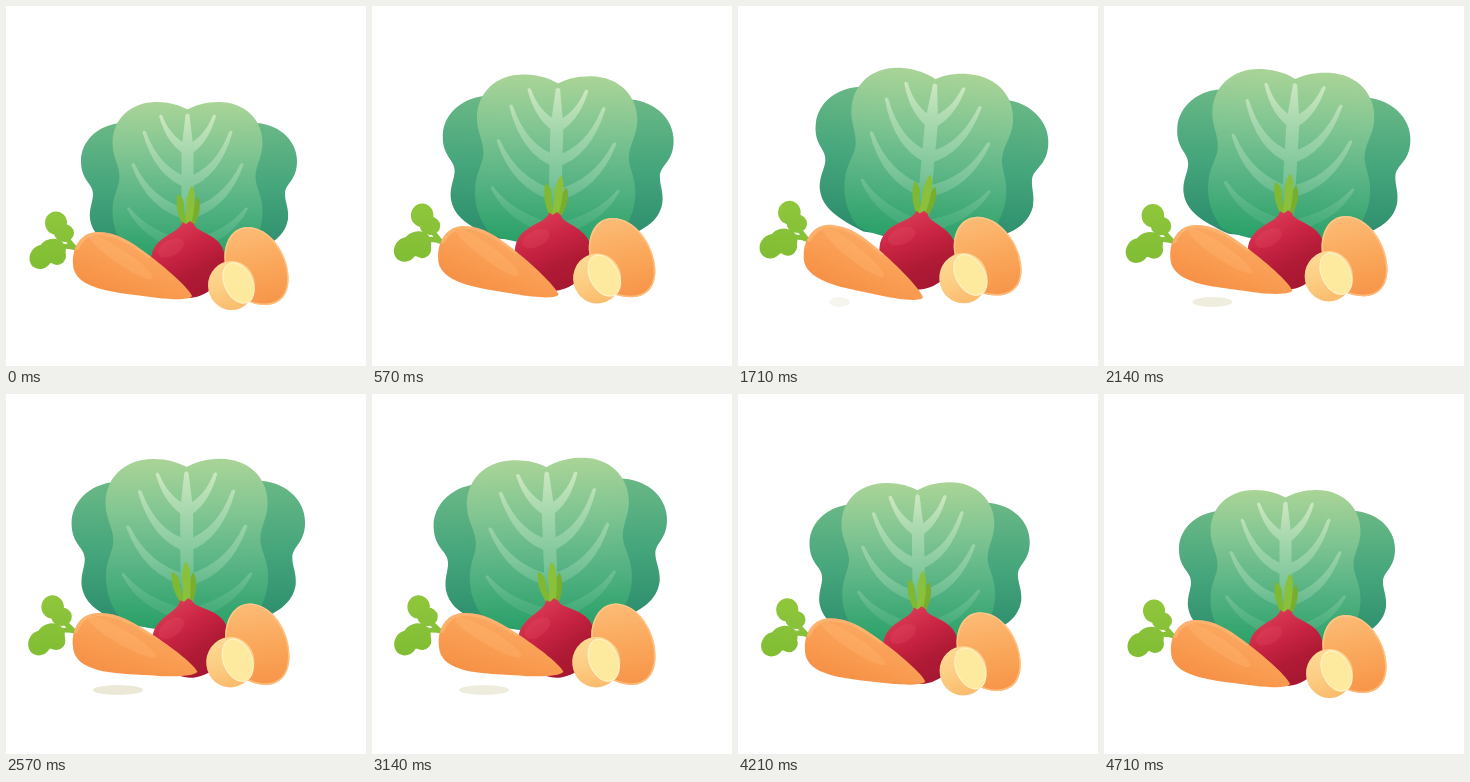
An HTML page with a canvas for the animation above (4.78 s loop, 360 by 360 pixels).

```html
<!DOCTYPE html>
<html lang="en">
<head>
<meta charset="utf-8">
<title>Swaying vegetables</title>
<style>
  html, body { margin: 0; width: 100%; height: 100%; overflow: hidden; background: #fff; }
  canvas { display: block; width: 360px; height: 360px; }
</style>
</head>
<body>
<canvas id="stage"></canvas>
<script>
const LOOP = 4780, STEPS = 67, SIZE = 360;
const canvas = document.getElementById('stage');
const ctx = canvas.getContext('2d');
const ratio = window.devicePixelRatio || 1;
canvas.width = canvas.height = SIZE * ratio;

// Smooth step from 0 to 1 between two times
function ramp(time, from, to) {
  const u = Math.min(1, Math.max(0, (time - from) / (to - from)));
  return u * u * (3 - 2 * u);
}

// The whole bunch rises, leans right, leans left, and settles again
const liftAt = t => ramp(t, 0, 750) - ramp(t, 3140, 4710);
const swayAt = t => ramp(t, 0, 1600) - 1.43 * ramp(t, 1700, 3000) + 0.43 * ramp(t, 3300, 4710);
const tiltAt = t => ramp(t, 0, 1200) - 2 * ramp(t, 1710, 2570) + ramp(t, 3140, 4650);

function place(x, y, scale, degrees, draw) {
  ctx.save();
  ctx.translate(x, y);
  ctx.rotate(degrees * Math.PI / 180);
  ctx.scale(scale, scale);
  draw();
  ctx.restore();
}

function linear(x0, y0, x1, y1, ...colors) {
  const g = ctx.createLinearGradient(x0, y0, x1, y1);
  colors.forEach((c, i) => g.addColorStop(i / (colors.length - 1), c));
  return g;
}

function fill(path, paint) {
  ctx.fillStyle = paint;
  ctx.fill(path);
}

function line(path, paint, width) {
  ctx.strokeStyle = paint;
  ctx.lineWidth = width;
  ctx.lineCap = 'round';
  ctx.stroke(path);
}

function innerLine(clip, path, paint, width) {
  ctx.save();
  ctx.clip(clip);
  line(path, paint, width);
  ctx.restore();
}

function ellipse(x, y, rx, ry, paint, turn = 0) {
  ctx.beginPath();
  ctx.ellipse(x, y, rx, ry, turn, 0, Math.PI * 2);
  ctx.fillStyle = paint;
  ctx.fill();
}

function mirrored(draw) {
  for (const side of [1, -1]) {
    ctx.save();
    ctx.scale(side, 1);
    draw();
    ctx.restore();
  }
}

const shape = {
  outerLeaf: new Path2D('M58-38C84-41 108-24 108 0C108 20 96 22 96 33C96 41 100 47 99 58C96 76 82 84 55 95L0 98V-30Z'),
  innerLeaf: new Path2D('M-1-51C8-56 18-59 31-59C58-59 75-41 75-18C75-4 68 4 68 16C68 26 75 34 75 50C75 66 70 78 60 90Q40 100-1 100Z'),
  stem: new Path2D('M-2-46Q0-49 2-46L6-12V98H-6V-12Z'),
  radish: new Path2D('M-6-39L-2-37L2-40L6-37C7-28 37-27 37-2C37 22 18 37 0 37C-18 37-37 22-37 0C-37-26-7-27-6-39Z'),
  carrot: new Path2D('M-26 3C-27-14-18-29-1-29C18-29 32-19 47-8C66 6 90 27 93 35C91 40 66 38 55 36.5C30 33 6 31-7 25C-20 20-26 12-26 3Z'),
  carrotRim: new Path2D('M-22-13C-16-25-9-28-1-28C17-28 34-17 50-5'),
  carrotStem: new Path2D('M-23-13Q-34-17-47-12M-25-14Q-31-20-37-29'),
  potato: new Path2D('M-9-39C-24-39-33-24-32-6C-31 16-20 38 8 39C26 39 33 26 32 10C31-12 14-39-9-39Z')
};

// Four ribs fan out from the stem, each lower and wider than the last
const ribs = Array.from({ length: 4 }, (_, i) => {
  const x = 59 - 32 * (1 - i / 3) ** 1.8;
  const y = 16 * i ** 1.6 - 45;
  const base = 32 * i - 11;
  return new Path2D(`M${x + 1.5} ${y}Q${x * 0.74} ${base - 4} 0 ${base + 6}V${base - 5}Q${x * 0.64} ${base - 14} ${x - 2} ${y}Q${x} ${y - 3} ${x + 1.5} ${y}Z`);
});

function drawLettuce() {
  const outer = linear(0, -42, 0, 90, '#6cb986', '#46a67c', '#2c8e6d');
  const inner = linear(0, -59, 0, 95, '#aad497', '#80c592', '#55b283', '#2ba169');
  const vein = linear(0, -50, 0, 80, '#d0e9c1', '#a3d6ac', '#7cc59a', '#46ad7b');
  mirrored(() => fill(shape.outerLeaf, outer));
  ctx.translate(-1.5, 0);
  mirrored(() => fill(shape.innerLeaf, inner));
  mirrored(() => ribs.forEach(rib => fill(rib, vein)));
  fill(shape.stem, vein);
}

function blade(tipX, tipY, baseX, width, paint) {
  const midX = (tipX * 2 + baseX) / 3, midY = tipY + 13;
  fill(new Path2D(`M${baseX - 3}-37Q${midX - width}-50 ${midX - width} ${midY}Q${tipX - 2} ${tipY} ${tipX} ${tipY}Q${midX + width + 1} ${tipY + 4} ${midX + width} ${midY}Q${midX + width}-48 ${baseX + 3}-37Z`), paint);
}

function drawRadish() {
  blade(-10, -67, -3, 3.5, '#7fb832');
  blade(10, -64, 4, 3.5, '#78ae2e');
  blade(4, -75, 0, 4, '#8ac03a');
  fill(shape.radish, linear(-20, -32, 14, 37, '#d93a54', '#c92443', '#b01a35', '#a51731'));
  ellipse(-17, -13, 14, 8, 'rgba(235,95,115,.18)', -0.5);
}

function drawCarrot() {
  const green = linear(-50, -50, -50, 10, '#8fc63c', '#80bd33');
  line(shape.carrotStem, green, 5);
  ellipse(-43, -38, 11, 11.5, green);
  ellipse(-35, -28, 10, 9, green);
  ellipse(-58, -4, 11, 12.5, green, 0.6);
  ellipse(-47, -10, 14, 12, green, -0.3);
  ellipse(-42, -5, 9, 9, green);
  fill(shape.carrot, linear(25, -22, 5, 32, '#fba760', '#f99c51', '#f69045'));
  ellipse(22, -4, 38, 7, 'rgba(255,185,115,.3)', 0.6);
  innerLine(shape.carrot, shape.carrotRim, 'rgba(255,190,125,.55)', 4);
}

function drawPotato() {
  fill(shape.potato, linear(-8, -39, 8, 39, '#fcbb76', '#faa85b', '#f79549'));
  innerLine(shape.potato, shape.potato, 'rgba(255,205,145,.7)', 3);
  ctx.translate(-25, 19.5);
  ellipse(0, 0, 23.5, 24.5, linear(-10, -22, 4, 24, '#fdd993', '#fccd83', '#fabb6c'));
  ellipse(7, -2.5, 14.5, 22, '#fff1c4', -0.45);
  ellipse(7, -2.5, 13.3, 20.8, '#fdea9f', -0.45);
}

function drawShadow(time) {
  const grow = ramp(time, 1000, 2600);
  ctx.globalAlpha = grow * (1 - ramp(time, 3000, 3500));
  ellipse(94 + 18 * grow, 296, 25 * grow, 5, '#ebe9d6');
  ctx.globalAlpha = 1;
}

function render(now) {
  const step = Math.floor((now % LOOP) * STEPS / LOOP + 0.1) % STEPS;
  const time = step * LOOP / STEPS;
  const lift = liftAt(time), sway = swayAt(time), tilt = tiltAt(time);
  ctx.setTransform(ratio, 0, 0, ratio, 0, 0);
  ctx.fillStyle = '#fff';
  ctx.fillRect(0, 0, SIZE, SIZE);
  drawShadow(time);
  place(183 + 11 * sway, 155 - 26.3 * lift, 1 + 0.081 * lift, 5.3 * sway, drawLettuce);
  place(182 - 2.5 * tilt, 255 - 9.5 * lift, 1 + 0.033 * lift, 6.5 * tilt, drawRadish);
  place(93 - 0.5 * tilt, 255 - 6.3 * lift, 1 + 0.026 * lift, 4.2 * tilt, drawCarrot);
  place(250.5 - tilt, 260 - 9.8 * lift, 1 + 0.028 * lift, -4.4 * tilt, drawPotato);
}

const start = performance.now();
function tick() {
  render(performance.now() - start);
  requestAnimationFrame(tick);
}
tick();
</script>
</body>
</html>
```
